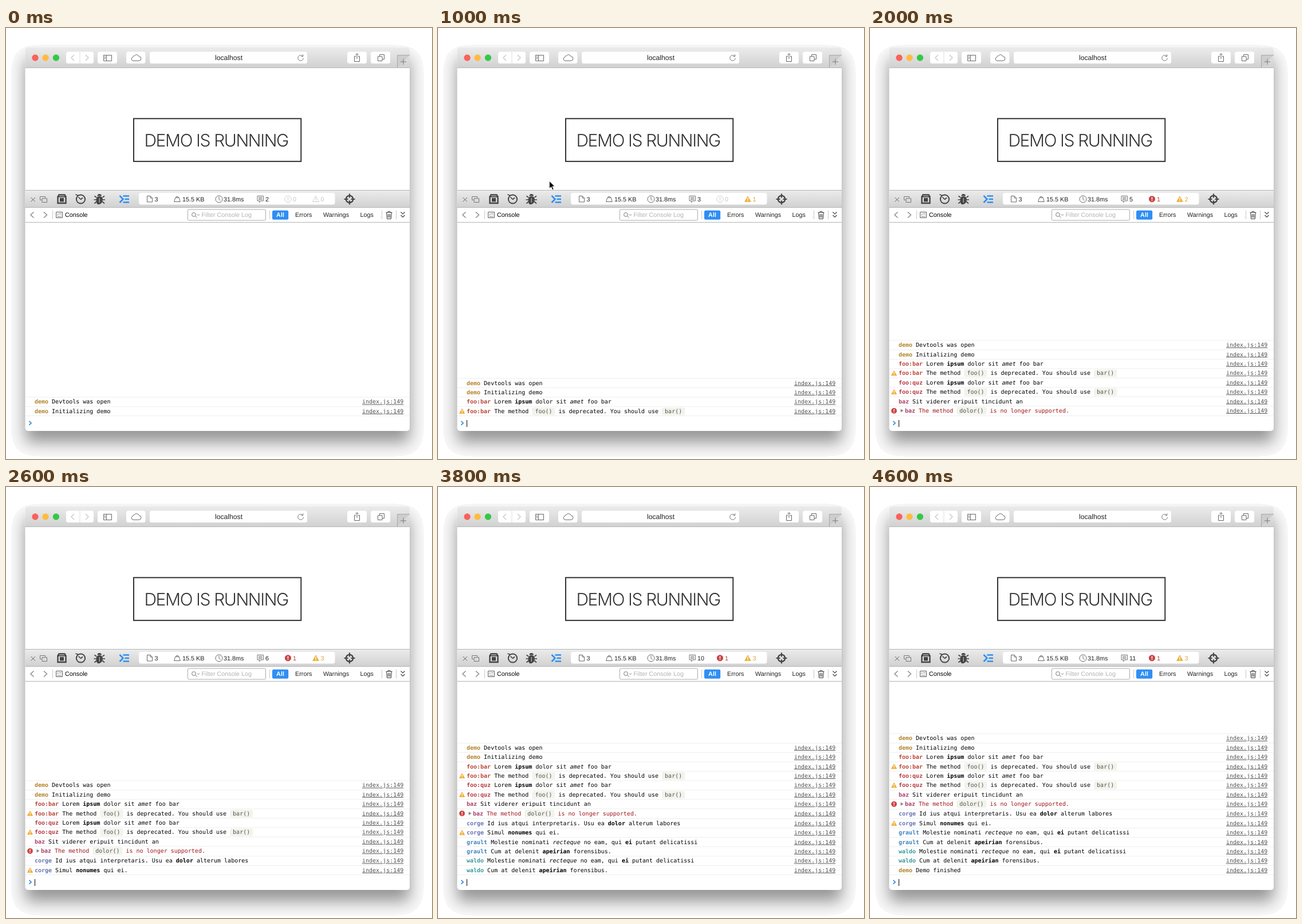
Animation of 744x753 px, one loop 4.8 s. Source, as an HTML page:

```html
<!DOCTYPE html>
<html lang="en">
<head>
<meta charset="utf-8">
<title>Console demo</title>
<style>
  html, body { margin: 0; width: 100%; height: 100%; overflow: hidden; background: #fff; }
  svg { display: block; text-rendering: geometricPrecision; }
  text { white-space: pre; }
  .ui { font: 10.8px "Liberation Sans", Arial, sans-serif; fill: #222; }
  .mono { font: 10px "DejaVu Sans Mono", monospace; }
  .line { fill: none; stroke: #666; stroke-width: 1; }
  .pill { fill: #fff; }
  .dim { opacity: .3; }
</style>
</head>
<body>
<svg width="744" height="753" viewBox="0 0 744 753">
  <defs>
    <linearGradient id="bar" x2="0" y2="1">
      <stop stop-color="#ebebeb"/><stop offset="1" stop-color="#d1d1d1"/>
    </linearGradient>
    <filter id="shadow" filterUnits="userSpaceOnUse" x="0" y="0" width="744" height="753">
      <feGaussianBlur stdDeviation="14"/>
      <feComponentTransfer><feFuncA id="bands" type="discrete"/></feComponentTransfer>
    </filter>
    <g id="warnIcon">
      <path d="M0-5 5.2 4.5H-5.2Z" fill="#eeb13c" stroke="#eeb13c" stroke-linejoin="round"/>
      <path d="M0-2.5V1.5M0 2.6V4" stroke="#fff" stroke-width="1.4"/>
    </g>
    <g id="errorIcon">
      <path d="M-2.2-5.4H2.2L5.4-2.2V2.2L2.2 5.4H-2.2L-5.4 2.2V-2.2Z" fill="#cb4444"/>
      <path d="M0-3.3V1M0 2V3.5" stroke="#fff" stroke-width="1.6"/>
    </g>
  </defs>

  <rect x="33.5" y="54" width="671.5" height="670" rx="5" filter="url(#shadow)"/>
  <rect x="33.5" y="34" width="671.5" height="670" rx="5" fill="#fff"/>

  <!-- browser toolbar -->
  <path d="M33.5 69.5V39q0-5 5-5H700q5 0 5 5V69.5Z" fill="url(#bar)"/>
  <path d="M33.5 69.5H705" stroke="#b9b9b9"/>
  <circle cx="51" cy="52" r="5.7" fill="#fc605b"/>
  <circle cx="69" cy="52" r="5.7" fill="#fdbc40"/>
  <circle cx="87.4" cy="52" r="5.7" fill="#34c84a"/>
  <g id="buttons" class="pill"></g>
  <path d="M129 42V62" stroke="#ddd"/>
  <g class="line">
    <path d="M119 47 114 52 119 57M139 47 144 52 139 57" stroke="#c4c4c4" stroke-width="1.2"/>
    <path d="M170.5 47.5H184.5V57.5H170.5ZM175.5 47.5V57.5M172 50H174M172 52H174M172 54H174"/>
    <path d="M222 57.3a3.2 3.2 0 0 1-.6-6.2 3 3 0 0 1 3-2.6 4.4 4.4 0 0 1 7.8 1.2 3.8 3.8 0 0 1-.2 7.6Z"/>
    <path d="M518.2 49.2a4.8 4.8 0 1 0 1.2 3.4M518.8 46.2V49.6H515.4" stroke="#777"/>
    <path d="M611 49.5H608.5V58.5H617.5V49.5H615M613 54V44.8M610.3 47.3 613 44.6 615.7 47.3"/>
    <path d="M652.5 50V46.5H660.5V54.5H657M649.5 49.8H657V57.5H649.5Z"/>
  </g>
  <path d="M683.5 69V47.5H705" fill="#cdcdcd" stroke="#aaa"/>
  <path d="M689 59H699M694 54V64" stroke="#777"/>
  <text class="ui" x="389" y="56" text-anchor="middle" style="font-size:12.2px">localhost</text>

  <!-- page -->
  <rect x="223" y="158.3" width="292.3" height="74.8" fill="none" stroke="#333" stroke-width="2"/>
  <text x="367.2" y="207" text-anchor="middle" fill="#333" font-size="30" font-weight="300"
    letter-spacing="-1.4" font-family="Inter, 'Liberation Sans', sans-serif">DEMO IS RUNNING</text>

  <!-- inspector toolbar -->
  <rect x="33.5" y="284" width="671.5" height="29.5" fill="url(#bar)"/>
  <path d="M33.5 283.5H705M33.5 313.5H705M33.5 339.5H705" stroke="#b4b4b4"/>
  <rect class="pill" x="232" y="288" width="342.5" height="20.5" rx="4"/>
  <g class="line">
    <path d="M43.5 296 51 303.5M51 296 43.5 303.5"/>
    <path d="M62 300.5H59.5V294.5H68.5V297M63 297.8H71.5V304.5H63Z" stroke="#777"/>
    <g stroke="#444" stroke-width="2">
      <path d="M92.5 291.5H102.5L104.5 294.5V306H90.5V294.5Z" stroke-width="2.4"/>
      <path d="M90 294.8H105"/>
      <rect x="95" y="298" width="5" height="4.5" fill="#444"/>
      <circle cx="130.5" cy="299" r="7.6"/>
      <path d="M130.5 299.5 126.5 295.5M130.5 299.5 134 296.5M121.5 291 126 292.5" stroke-width="1.7"/>
      <path d="M154.5 293.5 158 296M172 293.5 168.5 296M153.5 300H158M173 300H168.5M154.5 306.5 158 303.5M172 306.5 168.5 303.5" stroke-width="1.7"/>
      <circle cx="600" cy="299" r="6.2" stroke-width="2.3"/>
      <path d="M600 289.5V296.5M600 301.5V308.5M590.5 299H597.5M602.5 299H609.5" stroke-width="2.2"/>
    </g>
    <path d="M198.5 293 204.5 299 198.5 305M204.5 293.5H215M207.5 299H215M204.5 304.5H215" stroke="#2f8ff0" stroke-width="2.6"/>
    <path d="M246.5 293.5H252L255.5 297V304H246.5ZM252 293.5V297H255.5"/>
    <path d="M295.7 296.5H302.3L304.3 303.5H293.7ZM297 296.2a2 2 0 1 1 4 0"/>
    <circle cx="372" cy="299" r="6"/>
    <path d="M372 295V299.3L374.5 301.5"/>
    <path d="M439 293.5H449.5V302H445L442.5 305V302H439ZM441 296H447.5M441 298H447.5M441 300H447.5" stroke="#777"/>
  </g>
  <path d="M157.5 300q0-6 5.7-6t5.7 6-5.7 8-5.7-8ZM159.5 293.5q0-3.5 3.7-3.5t3.7 3.5Z" fill="#444"/>
  <path d="M163.2 297V305" stroke="#d8d8d8"/>
  <g class="ui">
    <text x="259.5" y="302.7">3</text>
    <text x="308" y="302.7">15.5 KB</text>
    <text x="380" y="302.7">31.8ms</text>
    <text id="logCount" x="453" y="302.7"></text>
  </g>
  <g id="noErrors" class="line dim"><circle cx="492.5" cy="299" r="5.8"/><path d="M492.5 295.5V300M492.5 301V302.5" stroke-width="1.4"/></g>
  <use id="hasErrors" href="#errorIcon" x="492.5" y="298.8"/>
  <text id="errorCount" class="ui" x="501" y="302.7"></text>
  <g id="noWarnings" class="line dim"><path d="M541 293.5 546.5 303.5H535.5ZM541 296.5V300.5M541 301.2V302.5"/></g>
  <use id="hasWarnings" href="#warnIcon" x="541" y="299"/>
  <text id="warnCount" class="ui" x="549.5" y="302.7"></text>

  <!-- console navigation -->
  <g class="line">
    <path d="M48.5 321.5 43 326.5 48.5 331.5M66 321.5 71.5 326.5 66 331.5" stroke="#888" stroke-width="1.4"/>
    <path d="M81.5 319V334M460.5 319V334M656.5 319V334M681.5 319V334" stroke="#c8c8c8"/>
    <path d="M87.5 321.5H98.5V331.5H87.5Z" fill="#eee"/>
    <path d="M89.5 324 91 325.5 89.5 327M89.5 329.5H96.5M93 324.5H96.5" stroke="#a98"/>
    <rect x="317.5" y="317" width="136" height="19" rx="2" stroke="#aaa"/>
    <circle cx="328" cy="326" r="3.4" stroke="#777"/>
    <path d="M330.5 328.5 333.5 331.5M334 325.5 336 327.5 338 325.5" stroke="#777"/>
    <path d="M663.5 322.5H674.5M667 322V320.5H671V322M664.5 322.5 665.5 333.5H672.5L673.5 322.5M667 325V331.5M669 325V331.5M671 325V331.5" stroke="#444"/>
    <path d="M689.5 321.5 693 325 696.5 321.5M689.5 327 693 330.5 696.5 327" stroke="#444" stroke-width="1.2"/>
  </g>
  <rect x="465" y="318.8" width="28.2" height="16" rx="2.5" fill="#2f8ef4"/>
  <g class="ui">
    <text x="103" y="330.3" fill="#000">Console</text>
    <text x="341.5" y="330.3" style="fill:#b3b3b3">Filter Console Log</text>
    <text x="479" y="330.3" text-anchor="middle" font-weight="bold" style="fill:#fff">All</text>
    <text x="505" y="330.3">Errors</text>
    <text x="554" y="330.3">Warnings</text>
    <text x="618.5" y="330.3">Logs</text>
  </g>

  <!-- console -->
  <g id="rows" class="mono"></g>
  <path d="M34 677.5H705" stroke="#eee"/>
  <path d="M40.5 686.8 44 690.2 40.5 693.6" fill="none" stroke="#3b8fe0" stroke-width="1.8"/>
  <path id="caret" d="M50.5 685V697" stroke="#000"/>
  <path id="pointer" d="M194.5 267.5V280.5L197.6 277.6 199.8 282.8 202 281.9 199.8 276.8H204Z" stroke="#fff" stroke-width=".8"/>
</svg>
<script>
const LOOP = 4800, STEP = 200;
const CHAR = 6.02, ROW = 16.4, BOTTOM = 677.6, BASELINE = 11.6;
const $ = id => document.getElementById(id);
const show = (id, on) => $(id).setAttribute('visibility', on ? 'visible' : 'hidden');

const colors = {
  demo: '#b5832c', 'foo:bar': '#b94436', 'foo:quz': '#b63a40', baz: '#a8406a',
  corge: '#6674b4', grault: '#3f84bd', waldo: '#3b9a9c'
};
// *bold*, _italic_, `code`
const lorem = 'Lorem *ipsum* dolor sit _amet_ foo bar';
const deprecated = 'The method `foo()` is deprecated. You should use `bar()`';
const molestie = 'Molestie nominati _recteque_ no eam, qui *ei* putant delicatissi';
const delenit = 'Cum at delenit *apeirian* forensibus.';
const messages = [
  ['demo', 'Devtools was open'],
  ['demo', 'Initializing demo'],
  ['foo:bar', lorem],
  ['foo:bar', deprecated, 'warn'],
  ['foo:quz', lorem],
  ['foo:quz', deprecated, 'warn'],
  ['baz', 'Sit viderer eripuit tincidunt an'],
  ['baz', 'The method `dolor()` is no longer supported.', 'error'],
  ['corge', 'Id ius atqui interpretaris. Usu ea *dolor* alterum labores'],
  ['corge', 'Simul *nonumes* qui ei.', 'warn'],
  ['grault', molestie],
  ['grault', delenit],
  ['waldo', molestie],
  ['waldo', delenit],
  ['demo', 'Demo finished']
].map(([name, text, level = 'log']) => ({ name, text, level }));

// moments at which two more messages arrive
const arrivals = [600, 1200, 1800, 2400, 2800, 3400, 4000];

function rowMarkup({ name, text, level }) {
  let x = level === 'error' ? 61 : 50;
  const ink = level === 'error' ? '#a0151a' : '#000';
  let out = '<path d="M34 .2H705" stroke="#eee"/>';
  const put = (run, attrs) => {
    out += `<text x="${x}" y="${BASELINE}" ${attrs}>${run}</text>`;
    x += run.length * CHAR;
  };
  if (level !== 'log') out += `<use href="#${level}Icon" transform="translate(42 8.3) scale(.88)"/>`;
  if (level === 'error') out += '<path d="M53.5 5.2 58.5 8.2 53.5 11.2Z" fill="#888"/>';
  put(name, `font-weight="bold" fill="${colors[name]}"`);
  x += CHAR;
  const parts = text.split(/([*_`])(.*?)\1/);
  for (let i = 0; i < parts.length; i += 3) {
    put(parts[i], `fill="${ink}"`);
    const [mark, run] = parts.slice(i + 1, i + 3);
    if (mark === '*') put(run, 'font-weight="bold"');
    if (mark === '_') put(run, 'font-style="italic"');
    if (mark === '`') {
      out += `<rect x="${x}" y="1.7" width="${run.length * CHAR + 10}" height="13.5" rx="2.5" fill="#f3f3ec"/>`;
      x += 5;
      put(run, 'fill="#555"');
      x += 5;
    }
  }
  return `<g>${out}<text x="622" y="${BASELINE}" fill="#555" text-decoration="underline">index.js:149</text></g>`;
}

$('rows').innerHTML = messages.map(rowMarkup).join('');
const rows = [...$('rows').children];
$('buttons').innerHTML = [[105, 48], [160, 34], [210, 33.5], [251, 275], [596, 34], [637, 34]]
  .map(([x, w]) => `<rect x="${x}" y="41.5" width="${w}" height="20.5" rx="3.5"/>`).join('');
$('bands').setAttribute('tableValues',
  Array.from({ length: 32 }, (_, i) => i && 0.03 + 0.4 * i / 32).join(' '));

function setCounter(id, icon, count, color) {
  $(id).textContent = count;
  $(id).style.fill = count ? color : '#c4c4c4';
  show('has' + icon, count > 0);
  show('no' + icon, !count);
}

function draw(time) {
  const t = Math.floor(time % LOOP / STEP) * STEP;
  const count = Math.min(messages.length, 2 + 2 * arrivals.filter(a => t >= a).length);
  let y = BOTTOM;
  for (let i = messages.length - 1; i >= 0; i--) {
    rows[i].setAttribute('visibility', i < count ? 'visible' : 'hidden');
    if (i >= count) continue;
    y -= ROW + (messages[i].level === 'error' ? 0.8 : 0);
    rows[i].setAttribute('transform', `translate(0 ${y.toFixed(2)})`);
  }
  const tally = level => messages.slice(0, count).filter(m => m.level === level).length;
  $('logCount').textContent = tally('log');
  setCounter('errorCount', 'Errors', tally('error'), '#c23a3a');
  setCounter('warnCount', 'Warnings', tally('warn'), '#dfa030');
  show('caret', t % 600 >= 200);
  show('pointer', t === 1000);
}

const start = performance.now();
function tick() {
  draw(performance.now() - start);
  requestAnimationFrame(tick);
}
tick();
</script>
</body>
</html>
```
